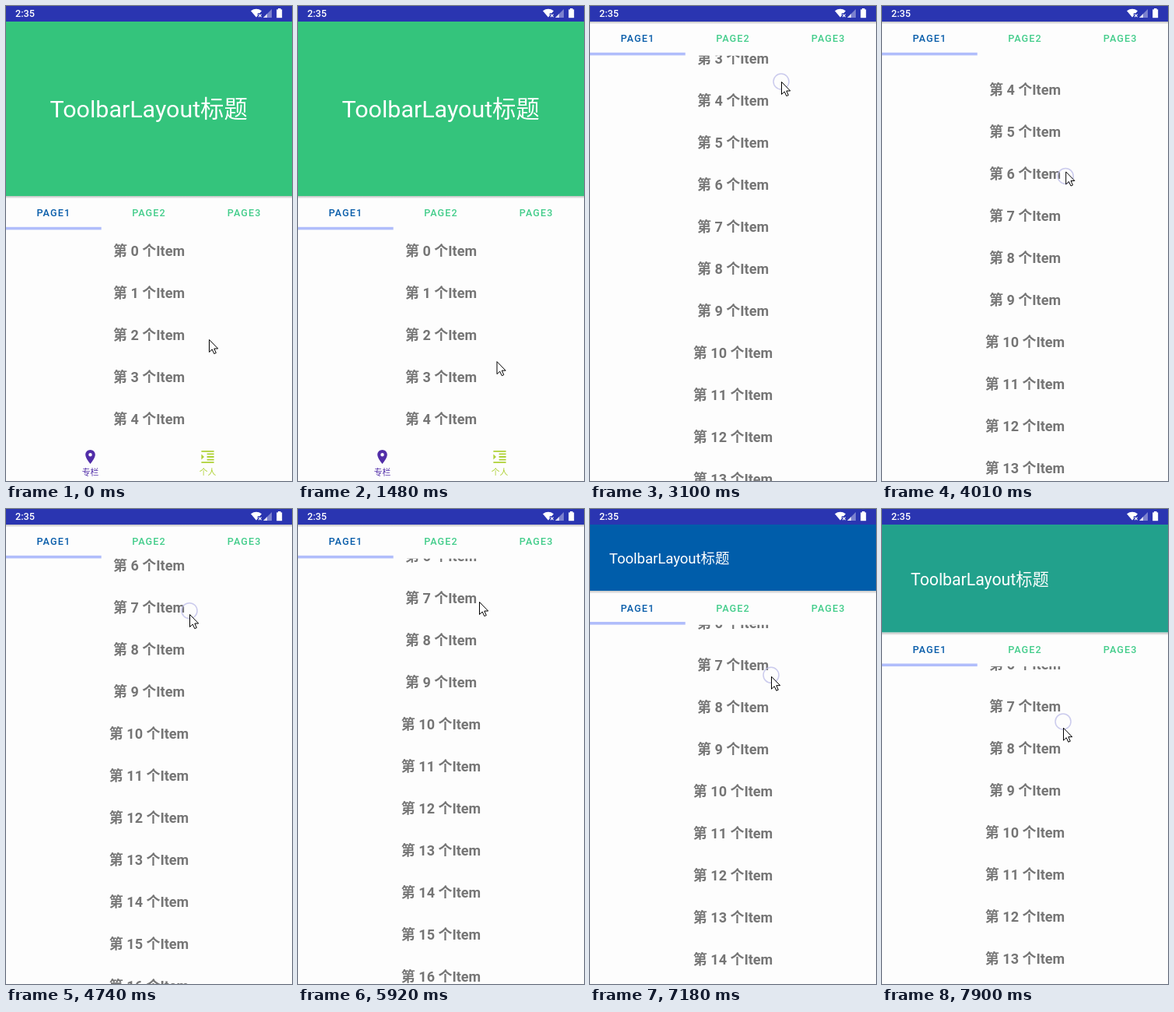
An HTML page with a canvas for the animation above (7.99 s loop, 368 by 610 pixels).

```html
<!DOCTYPE html>
<html lang="zh-CN">
<head>
<meta charset="utf-8">
<title>Collapsing toolbar</title>
<style>
  html, body { margin: 0; width: 100%; height: 100%; overflow: hidden; background: #fdfdfd; }
  canvas { display: block; width: 368px; height: 610px; }
</style>
</head>
<body>
<canvas id="stage"></canvas>
<script>
const W = 368, H = 610, LOOP = 7990, STEP = 90, PHASE = 40;
const FONT = 'Roboto, "Noto Sans CJK SC", "Noto Sans CJK", "Noto Sans CJK JP", sans-serif';
const PAPER = '#fdfdfd', GREEN = [52, 196, 124], BLUE = [0, 93, 170];
const BAR_TOP = 20, BAR_OPEN = 244, COLLAPSE = 174;
const ROW = 54, TABS_H = 43.4;

const canvas = document.getElementById('stage');
const ctx = canvas.getContext('2d');
const dpr = window.devicePixelRatio || 1;
canvas.width = W * dpr;
canvas.height = H * dpr;

const mix = (a, b, k) => a + (b - a) * k;

// Piecewise linear track made of [time, value] points.
function track(...keys) {
  return t => {
    if (t <= keys[0][0]) return keys[0][1];
    for (let i = 1; i < keys.length; i++) {
      const [t0, v0] = keys[i - 1], [t1, v1] = keys[i];
      if (t <= t1) return mix(v0, v1, (t - t0) / (t1 - t0));
    }
    return keys[keys.length - 1][1];
  };
}

const cursorX = track([1030, 261], [1300, 256], [1390, 256], [1930, 253], [2110, 253],
  [2380, 252], [3100, 246], [3470, 246], [4010, 236], [5290, 236], [5640, 233]);

const cursorY = track([1030, 428], [1300, 445], [1390, 445], [1930, 512], [2110, 512],
  [2200, 490], [2290, 422], [2380, 346], [2470, 288], [2560, 240], [2650, 202],
  [2830, 147], [3010, 107], [3100, 97], [3470, 97], [3560, 112], [3740, 215],
  [3830, 245], [3920, 232], [4010, 210], [4100, 173], [4190, 147], [4280, 135],
  [5290, 135], [5640, 119], [5920, 119], [6010, 122], [6370, 152], [6730, 186],
  [7000, 208], [7180, 216], [7360, 226], [7540, 244], [7900, 284]);

const touchY = track([2200, 506], [2290, 452], [2380, 372], [2470, 308], [2560, 257],
  [2650, 215], [2830, 155], [3010, 111], [3100, 97], [3470, 97], [3830, 245],
  [3920, 238], [4010, 216], [4100, 181], [4190, 152], [4280, 135], [5900, 119],
  [6010, 120], [6370, 148], [6730, 182], [7000, 205], [7180, 215], [7360, 223],
  [7540, 239], [7900, 276]);

const barBottom = track([2200, 244], [2290, 209], [2380, 151], [2470, 84], [2560, 28],
  [2600, 20], [6010, 20], [6100, 22], [6370, 40], [6730, 73], [7000, 96],
  [7180, 107], [7360, 115], [7540, 128], [7900, 161.5]);

const listScroll = track([2600, 0], [2650, 39], [2740, 81], [2830, 114], [2920, 140],
  [3010, 164], [3100, 185], [3830, 185], [3920, 187], [4010, 201], [4100, 250],
  [4190, 292], [4280, 320], [4370, 332], [4650, 332], [4740, 345], [4830, 354]);

const scrim = track([2440, 0], [2560, 0.06], [2740, 0.38], [3010, 1],
  [7630, 1], [7720, 0.76], [7810, 0.47], [7900, 0.28]);

const navShift = track([2110, 0], [2200, 4], [2290, 26], [2380, 54]);

const touching = t => [[2200, 3280], [3830, 4740], [6010, LOOP]].some(([a, b]) => t >= a && t < b);

const PIN = new Path2D('M12 2C8.13 2 5 5.13 5 9c0 5.25 7 13 7 13s7-7.75 7-13c0-3.87-3.13-7-7-7z' +
  'M12 11.5a2.5 2.5 0 1 1 0-5 2.5 2.5 0 0 1 0 5z');
const INDENT = new Path2D('M3 21h18v-2H3zM3 8v8l4-4zM11 17h10v-2H11zM3 3v2h18V3zM11 9h10V7H11zM11 13h10v-2H11z');
const ARROW = new Path2D('M.5 .5V16.5L4.2 13L6.8 18.6L9.3 17.5L6.8 12H11.7Z');
const FAN = new Path2D('M315 6.2Q322 1.4 329 6.2L326.4 9.3H323.8V12.4L322 14.6Z');

function rect(color, x, y, w, h) {
  ctx.fillStyle = color;
  ctx.fillRect(x, y, w, h);
}

// Draws text with its capitals centred on y.
function label(str, x, y, size, color, weight = 400, align = 'center', spacing = 0) {
  ctx.font = `${weight} ${size}px ${FONT}`;
  ctx.textAlign = align;
  ctx.letterSpacing = spacing + 'px';
  ctx.fillStyle = color;
  ctx.fillText(str, x, y + size * 0.355);
}

function clipped(x, y, w, h, paint) {
  if (h <= 0) return;
  ctx.save();
  ctx.beginPath();
  ctx.rect(x, y, w, h);
  ctx.clip();
  paint();
  ctx.restore();
}

function drawList(bar, scroll) {
  const top = bar + TABS_H;
  clipped(0, top, W, H - top, () => {
    for (let i = 0; i < 30; i++) {
      const y = bar + 71 + ROW * i - scroll;
      if (y > top - 20 && y < H + 20) label(`第 ${i} 个Item`, 184, y, 18, '#757575', 700);
    }
  });
}

function drawBar(bar, shade) {
  const color = `rgb(${GREEN.map((c, i) => Math.round(mix(c, BLUE[i], shade)))})`;
  clipped(0, BAR_TOP, W, bar - BAR_TOP, () => {
    rect(color, 0, BAR_TOP, W, bar - BAR_TOP);
    const f = Math.min(1, (BAR_OPEN - bar) / COLLAPSE);
    const size = mix(30.4, 18, 1 - (1 - f) ** 2);
    const pinned = Math.min(0, bar - (BAR_OPEN - COLLAPSE));
    label('ToolbarLayout标题', 56.6 - 39.8 * f, 132 - 85.5 * f + pinned, size, '#fff', 400, 'left');
  });
}

function drawTabs(bar) {
  rect(PAPER, 0, bar, W, TABS_H);
  const shadow = ctx.createLinearGradient(0, bar, 0, bar + 3.5);
  shadow.addColorStop(0, 'rgba(0,0,0,.24)');
  shadow.addColorStop(1, 'rgba(0,0,0,0)');
  rect(shadow, 0, bar, W, 3.5);
  for (let i = 0; i < 3; i++) {
    label('PAGE' + (i + 1), W / 6 * (2 * i + 1), bar + 22, 12.6, i ? '#43cd8b' : '#075ca9', 500, 'center', 1.125);
  }
  rect('#b0bdfb', 0, bar + 39.8, W / 3, 3.6);
}

function drawStatus() {
  rect('#2a35b1', 0, 0, W, BAR_TOP);
  label('2:35', 12, 10, 12.6, '#fff', 500, 'left');
  ctx.fillStyle = '#fff';
  ctx.fill(FAN);
  ctx.strokeStyle = '#fff';
  ctx.lineWidth = 1.1;
  ctx.beginPath();
  ctx.moveTo(325, 10.6); ctx.lineTo(328.6, 14.2);
  ctx.moveTo(328.6, 10.6); ctx.lineTo(325, 14.2);
  ctx.stroke();
  signal(342, 'rgba(255,255,255,.38)');
  signal(336, 'rgba(255,255,255,.75)');
  rect('#fff', 350, 3, 3.5, 2);
  rect('#fff', 348.2, 4.4, 7, 10.8);
}

function signal(right, color) {
  ctx.fillStyle = color;
  ctx.beginPath();
  ctx.moveTo(331, 15);
  ctx.lineTo(right, 15);
  ctx.lineTo(right, 15 - (right - 331));
  ctx.fill();
}

function navItem(icon, text, x, y, color) {
  ctx.save();
  ctx.translate(x - 10.8, y + 8.2);
  ctx.scale(0.9, 0.9);
  ctx.fillStyle = color;
  ctx.fill(icon, 'evenodd');
  ctx.restore();
  label(text, x, y + 39, 10.8, color);
}

function drawNav(shift) {
  const y = 560 + shift;
  if (y >= H) return;
  rect(PAPER, 0, y, W, H - y);
  navItem(PIN, '专栏', 108.5, y, '#512da8');
  navItem(INDENT, '个人', 259.5, y, '#afd136');
}

function drawPointer(t) {
  const x = cursorX(t);
  if (touching(t)) {
    ctx.beginPath();
    ctx.arc(x, touchY(t), 10, 0, Math.PI * 2);
    ctx.strokeStyle = 'rgba(190,190,232,.8)';
    ctx.lineWidth = 1.5;
    ctx.stroke();
  }
  ctx.save();
  ctx.translate(x, cursorY(t));
  ctx.fillStyle = '#fff';
  ctx.fill(ARROW);
  ctx.strokeStyle = '#000';
  ctx.lineWidth = 1;
  ctx.stroke(ARROW);
  ctx.restore();
}

function draw(t) {
  const bar = barBottom(t);
  ctx.setTransform(dpr, 0, 0, dpr, 0, 0);
  rect(PAPER, 0, 0, W, H);
  drawList(bar, listScroll(t));
  drawBar(bar, scrim(t));
  drawTabs(bar);
  drawStatus();
  drawNav(navShift(t));
  drawPointer(t);
}

// The screen refreshes in fixed steps.
const start = performance.now();
function frame() {
  const t = (performance.now() - start) % LOOP;
  draw(Math.max(0, Math.floor((t - PHASE) / STEP) * STEP + PHASE));
  requestAnimationFrame(frame);
}
frame();
</script>
</body>
</html>
```
